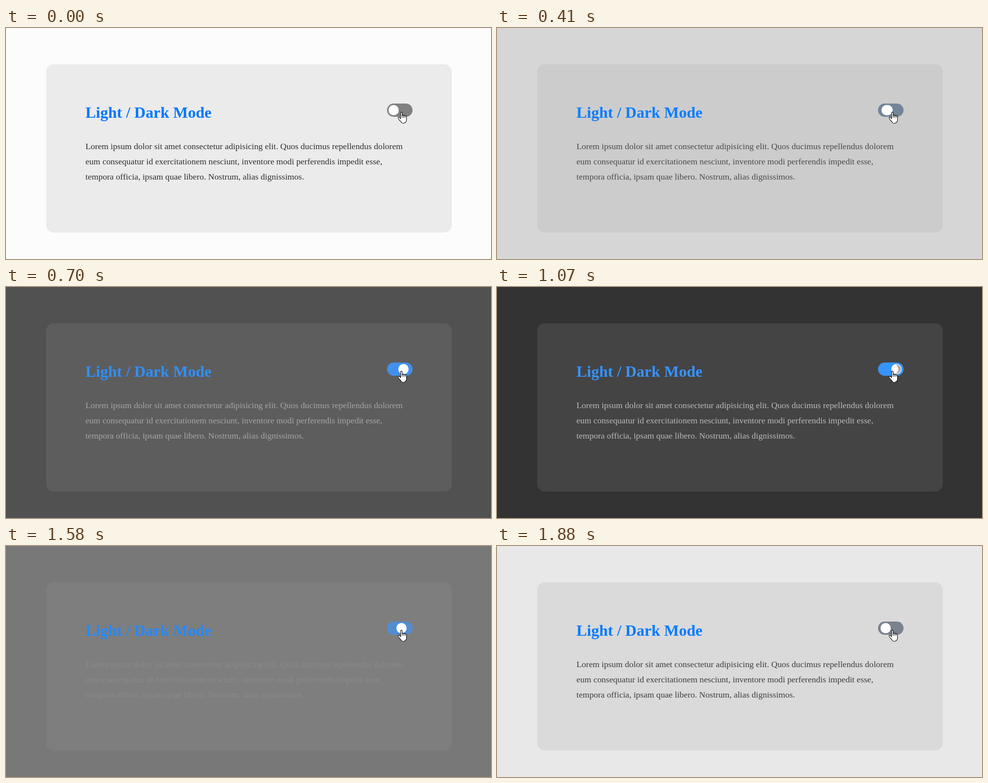
An HTML page for the animation above (1950 ms loop, 989x471 px).

```html
<!DOCTYPE html>
<html lang="en">
<head>
<meta charset="utf-8">
<title>Light / Dark Mode</title>
<style>
  :root {
    --p: 0;
    --w: 21;
    --dark: calc(var(--p) * 100%);
    --accent: color-mix(in srgb, #0077ff, #3694ff var(--dark));
  }
  html, body {
    margin: 0;
    width: 100%;
    height: 100%;
    overflow: hidden;
  }
  body {
    position: relative;
    background: color-mix(in srgb, #fcfcfc, #333 var(--dark));
    font-family: "Liberation Serif", "Times New Roman", serif;
  }
  .card, h1, p, .track, .knob, svg { position: absolute; margin: 0; }
  .card {
    left: 82px; top: 74px; width: 827px; height: 343px;
    border-radius: 15px;
    background: color-mix(in srgb, #ebebeb, #444 var(--dark));
  }
  h1 {
    left: 162px; top: 154px;
    font-size: 32px;
    font-weight: bold;
    white-space: nowrap;
    color: var(--accent);
  }
  p {
    left: 162px; top: 226px;
    font-size: 17.6px;
    line-height: 31px;
    white-space: nowrap;
    color: color-mix(in srgb, #2e2e2e, #bbb var(--dark));
  }
  .track {
    left: 777px; top: 154px; width: 52px; height: 27px;
    border-radius: 14px;
    background: color-mix(in srgb, #808080, #3694ff var(--dark));
  }
  /* The knob is anchored left when light and right when dark. */
  .knob {
    left: calc(3px + var(--p) * (45px - var(--w) * 1px));
    top: 3px;
    width: calc(var(--w) * 1px);
    height: 21px;
    border-radius: 10.5px;
    background: #fff;
  }
  svg { left: 0; top: 0; }
</style>
</head>
<body>
  <div class="card"></div>
  <h1>Light / Dark Mode</h1>
  <p>Lorem ipsum dolor sit amet consectetur adipisicing elit. Quos ducimus repellendus dolorem<br>eum consequatur id exercitationem nesciunt, inventore modi perferendis impedit esse,<br>tempora officia, ipsam quae libero. Nostrum, alias dignissimos.</p>
  <div class="track"><div class="knob"></div></div>
  <svg width="989" height="471" viewBox="0 0 989 471">
    <path id="shade" fill="#aaa" d="M812.5 158.4A9.3 9.3 0 1 1 812.5 176.6A10 10 0 0 0 812.5 158.4Z"/>
    <g stroke="#000" stroke-width="1.1" stroke-linejoin="round" stroke-linecap="round">
      <path fill="#fff" d="M804.7 173.2a1.6 1.6 0 0 1 3.2 0v5.2q.3-.8 1.5-.8t1.6 1.2q.3-.7 1.4-.7t1.6 1.2q.3-.5 1.1-.5 1.6 0 1.6 2v6.7q0 2.6-1.6 4.4-2 2.6-5.2 2.6-2.700 0-4.300-2.800l-4-4.500q-2.600-3.600-1.800-4.800 1.600-1.400 3.200.6l1.700 1.800z"/>
      <path fill="none" d="M807.9 178.4v3.8M811 179v3.2M814 179.500v2.700"/>
    </g>
  </svg>
<script>
  const LOOP = 1950;
  const HOLD = 74;              // each picture stays this long
  const FADE = 10 * HOLD;
  const PRESS = 130;            // the knob stretches this long before and after a click
  const KNOB = 21, STRETCH = 17;
  const toDark = { begin: 170, click: 280 };
  const toLight = { begin: 1280, click: 1412 };

  const root = document.documentElement.style;
  const shade = document.getElementById('shade').style;
  let start;

  // CSS "ease": cubic-bezier(.25, .1, .25, 1)
  function ease(x) {
    if (x <= 0 || x >= 1) return x <= 0 ? 0 : 1;
    let low = 0, high = 1, u;
    for (let i = 0; i < 24; i++) {
      u = (low + high) / 2;
      if (0.75 * u * (1 - u) + u ** 3 < x) low = u; else high = u;
    }
    return 0.3 * u * (1 - u) ** 2 + 3 * u * u * (1 - u) + u ** 3;
  }

  function draw(now) {
    start ??= now;
    const time = (now - start) % LOOP;
    const phase = time < toLight.begin ? toDark : toLight;
    const held = phase.begin + Math.floor((time - phase.begin) / HOLD) * HOLD;
    const since = held - phase.click;
    const progress = ease(since / FADE);
    const dark = phase === toDark ? progress : 1 - progress;
    root.setProperty('--p', dark);
    root.setProperty('--w', KNOB + STRETCH * Math.max(0, 1 - Math.abs(since) / PRESS));
    shade.visibility = dark > 0.97 ? 'visible' : 'hidden';
    requestAnimationFrame(draw);
  }
  requestAnimationFrame(draw);
</script>
</body>
</html>
```
